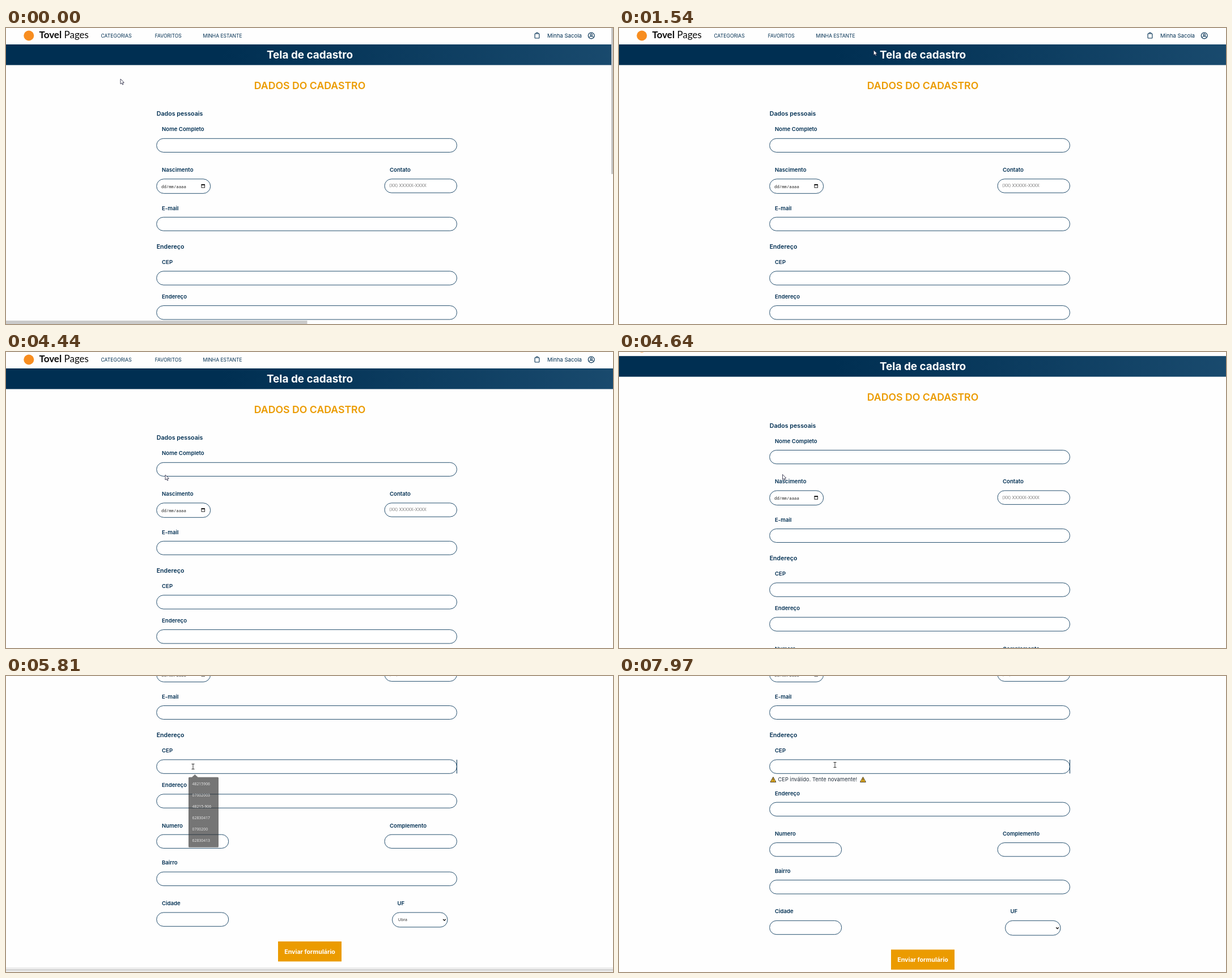
These frames come from a looping animation (1071x523 px, 8 s). An HTML page with a canvas:

```html
<!DOCTYPE html>
<html lang="pt-BR">
<head>
<meta charset="utf-8">
<title>Tela de cadastro</title>
<style>
  html, body { margin: 0; width: 100%; height: 100%; overflow: hidden; background: #fff; }
  canvas { display: block; width: 1071px; height: 523px; }
</style>
</head>
<body>
<canvas id="stage"></canvas>
<script>
const W = 1071, H = 523, LOOP = 8000;
const NAVY = '#002f52', LINE = '#26506f', ORANGE = '#eb9b00';
const SANS = 'Inter, "Open Sans", sans-serif';
const OPEN = '"Open Sans", "Noto Sans", sans-serif';
const MONO = '"Noto Sans Mono", "DejaVu Sans Mono", monospace';

const canvas = document.getElementById('stage');
const ratio = window.devicePixelRatio || 1;
canvas.width = Math.round(W * ratio);
canvas.height = Math.round(H * ratio);
const c = canvas.getContext('2d');

// time, x, y of the pointer
const POINTER = [
  [70, 202, 90], [870, 192, 14], [1340, 192, 14], [1540, 448, 39],
  [1800, 780, 26], [2100, 963, 15], [2170, 965, 14], [2500, 1024, 13], [2790, 1033, 12],
  [3470, 1033, 12], [4230, 262, 170], [4440, 281, 217], [5050, 304, 215],
  [5540, 330, 160], [6150, 330, 160], [6500, 690, 162], [6730, 895, 163],
  [7310, 895, 163], [7370, 856, 161], [7570, 856, 160], [7770, 600, 138], [7970, 381, 157]
];
const SCROLL = [[4600, 0], [5050, 239.5], [5300, 281.8]];
const ERROR_AT = 7110, ERROR_H = 14.4;

// x, y, width, height in page space
const FIELDS = [
  [265.7, 195.3, 529.8, 24.2], [265.7, 266.8, 95, 25.5], [668, 266.8, 127.5, 24.4],
  [265.7, 334.3, 529.8, 24], [265.7, 429.7, 529.8, 24.4]
];
const LOWER_FIELDS = [
  [265.7, 490.6, 529.8, 24.4], [265.7, 562, 127, 24.2], [668, 562, 127.5, 24.2],
  [265.7, 628, 529.8, 24.4], [265.7, 699.7, 127, 24.4], [681.5, 699.7, 97.5, 25.8]
];
const LABELS = [
  ['Nome Completo', 275, 179], ['Nascimento', 275, 250.7], ['Contato', 677, 250.7],
  ['E-mail', 275, 318.3], ['CEP', 275, 413.5]
];
const LOWER_LABELS = [
  ['Endereço', 275, 474.5], ['Numero', 275, 546], ['Complemento', 677, 546],
  ['Bairro', 275, 611.8], ['Cidade', 275, 683.3], ['UF', 690.5, 683.3]
];
const CODES = ['48215906', '07002003', '48215-906', '62830417', '0700200', '62830413'];

const clamp = v => Math.max(0, Math.min(1, v));
const ramp = (t, a, b) => clamp((t - a) / (b - a));

function track(keys, t, k) {
  let i = 0;
  while (i < keys.length - 1 && t >= keys[i + 1][0]) i++;
  const a = keys[i], b = keys[Math.min(i + 1, keys.length - 1)];
  return a === b ? a[k] : a[k] + (b[k] - a[k]) * ramp(t, a[0], b[0]);
}

// cy is the middle of the capital letters
function text(str, x, cy, size, color = NAVY, weight = 400, family = SANS, align = 'left') {
  c.font = `${weight} ${size}px ${family}`;
  c.fillStyle = color;
  c.textAlign = align;
  c.fillText(str, x, cy + size * 0.36);
}

function rect(x, y, w, h, color) {
  c.fillStyle = color;
  c.fillRect(x, y, w, h);
}

function path(points, close) {
  c.beginPath();
  points.forEach(([x, y], i) => i ? c.lineTo(x, y) : c.moveTo(x, y));
  if (close) c.closePath();
}

function disc(x, y, r, color) {
  c.beginPath();
  c.arc(x, y, r, 0, 7);
  c.fillStyle = color;
  c.fill();
}

function stroke(color, width = 1) {
  c.strokeStyle = color;
  c.lineWidth = width;
  c.stroke();
}

function field([x, y, w, h]) {
  c.beginPath();
  c.roundRect(x, y, w, h, h / 2);
  c.fillStyle = '#fff';
  c.fill();
  stroke(LINE);
}

function bag(x) {
  c.beginPath();
  c.roundRect(x + 0.6, 10, 7.8, 8, 0.8);
  stroke(NAVY, 1.1);
  c.beginPath();
  c.arc(x + 4.5, 10, 2, Math.PI, 0);
  stroke(NAVY, 1.1);
}

function account(x, y, color) {
  c.beginPath();
  c.arc(x, y, 5.4, 0, 7);
  stroke(color, 1.2);
  c.beginPath();
  c.arc(x, y - 1.3, 1.8, 0, 7);
  stroke(color, 1.1);
  c.beginPath();
  c.arc(x, y + 5.2, 4.2, Math.PI * 1.2, Math.PI * 1.8);
  stroke(color, 1.1);
}

function header(hover) {
  disc(40.3, 13.5, 9, '#f78d20');
  text('Tovel', 58.5, 12, 17, '#0a0a0a', 700, 'Lato, sans-serif');
  text('Pages', 102.5, 12, 17, '#0a0a0a', 400, 'Lato, sans-serif');
  text('CATEGORIAS', 167.5, 13.7, 8.6);
  text('FAVORITOS', 262.7, 13.5, 8.6);
  text('MINHA ESTANTE', 347.5, 13.5, 8.5);
  const dx = hover ? -4.5 : 0;
  bag(932.5 + dx);
  text('Minha Sacola', 955 + dx, 13.5, 9.6);

  const g = c.createLinearGradient(W * 0.355, 0, W * 1.654, 0);
  g.addColorStop(0, NAVY);
  g.addColorStop(1, '#326589');
  rect(0, 29, W, 36.5, g);
  text('Tela de cadastro', 536, 47, 18.9, '#fff', 700, SANS, 'center');

  if (hover) rect(1011, 0, 39, 32.5, NAVY);
  account(hover ? 1031 : 1032.7, hover ? 14 : 13.5, hover ? '#fff' : NAVY);
}

function warning(x, y) {
  path([[x, y - 4.5], [x + 4.9, y + 4.4], [x - 4.9, y + 4.4]], true);
  c.fillStyle = '#f6b91f';
  c.fill();
  stroke('#3b3320', 1);
  rect(x - 0.5, y - 1.5, 1, 3, '#222');
  rect(x - 0.5, y + 2.2, 1, 1, '#222');
}

function label([str, x, y]) {
  text(str, x, y, 9.6, NAVY, 600);
}

function form(t) {
  text('DADOS DO CADASTRO', 536, 101.5, 17.7, ORANGE, 600, SANS, 'center');
  text('Dados pessoais', 265.7, 151.5, 10.7, NAVY, 600);
  text('Endereço', 265.7, 386, 10.6, NAVY, 600);
  FIELDS.forEach(field);
  LABELS.forEach(label);
  text('dd/mm/aaaa', 274, 280.3, 7.3, '#222', 400, MONO);
  c.strokeStyle = '#111';
  c.lineWidth = 0.9;
  c.strokeRect(345, 276.8, 5.6, 5.2);
  rect(344.6, 276, 6.4, 1.9, '#111');
  text('(XX) XXXXX-XXXX', 676, 278.7, 7.4, '#777');
  if (t >= 5740) rect(795, 429.7, 1, 24.4, NAVY);

  const failed = t >= ERROR_AT;
  if (failed) {
    warning(272, 464.8);
    text('CEP inválido. Tente novamente!', 280.5, 464.3, 9.4, '#26323f');
    warning(430.5, 464.8);
  }
  c.save();
  c.translate(0, failed ? ERROR_H : 0);
  LOWER_FIELDS.forEach(field);
  LOWER_LABELS.forEach(label);
  if (!failed) text('Ubra', 691.8, 712.3, 7, '#222', 400, OPEN);
  path([[771.2, 711.6], [773.5, 713.9], [775.8, 711.6]]);
  stroke('#111', 1.4);
  rect(480, 750.8, 112, 35.4, ORANGE);
  text('Enviar formulário', 536, 768.6, 10.7, '#fff', 700, SANS, 'center');
  rect(0, 796.6, W, 40, '#ececec');
  rect(0, 800.6, W, 1, '#b4b4b4');
  c.restore();
}

function suggestions(t) {
  const alpha = ramp(t, 5700, 5870) * (1 - ramp(t, 6706, 6920));
  if (!alpha) return;
  c.save();
  c.globalAlpha = alpha;
  c.beginPath();
  c.roundRect(322, 178.7, 53, 124, 1.5);
  c.moveTo(328, 178.8);
  c.lineTo(333.3, 174);
  c.lineTo(338.6, 178.8);
  c.fillStyle = '#2e2e2e';
  c.fill();
  c.globalAlpha = Math.min(1, alpha * 1.3);
  CODES.forEach((s, i) => text(s, 328.5, 191 + i * 20, 6.9, '#fff', 400, OPEN));
  c.restore();
}

function overField(x, y) {
  return FIELDS.concat(LOWER_FIELDS).some(([fx, fy, w, h]) =>
    x > fx && x < fx + w && y > fy - 1 && y < fy + h + 1);
}

function pointer(t, scroll) {
  const x = track(POINTER, t, 1), y = track(POINTER, t, 2);
  if (t >= 6700 && t < 6910) disc(895.5, 163, 7, 'rgba(247, 238, 50, 0.8)');
  if (t > 4500 && overField(x, y + scroll)) {
    path([[x - 2.5, y - 4.5], [x + 2.5, y - 4.5]]);
    c.moveTo(x, y - 4.5);
    c.lineTo(x, y + 4.5);
    c.moveTo(x - 2.5, y + 4.5);
    c.lineTo(x + 2.5, y + 4.5);
    stroke('#333', 1);
    return;
  }
  path([[0, 0], [0, 9], [2.1, 7.2], [3.6, 10.2], [5, 9.5], [3.7, 6.7], [6.3, 6.4]]
    .map(([px, py]) => [x + px, y + py]), true);
  c.fillStyle = '#fff';
  c.fill();
  stroke('#1c1c38', 0.8);
}

function draw(t) {
  const scroll = track(SCROLL, Math.max(t, SCROLL[0][0]), 1);
  c.setTransform(ratio, 0, 0, ratio, 0, 0);
  rect(0, 0, W, H, '#fefefe');
  c.save();
  c.translate(0, -scroll);
  header(t >= 2400 && t < 3520);
  form(t);
  c.restore();
  suggestions(t);
  if (t < 70) {
    rect(1068, 0, 3, 258, '#c4c4c4');
    rect(0, 517, 531.5, 6, '#cacaca');
  }
  pointer(Math.max(t, POINTER[0][0]), scroll);
}

const start = performance.now();
function tick() {
  draw((performance.now() - start) % LOOP);
  requestAnimationFrame(tick);
}
tick();
</script>
</body>
</html>
```
